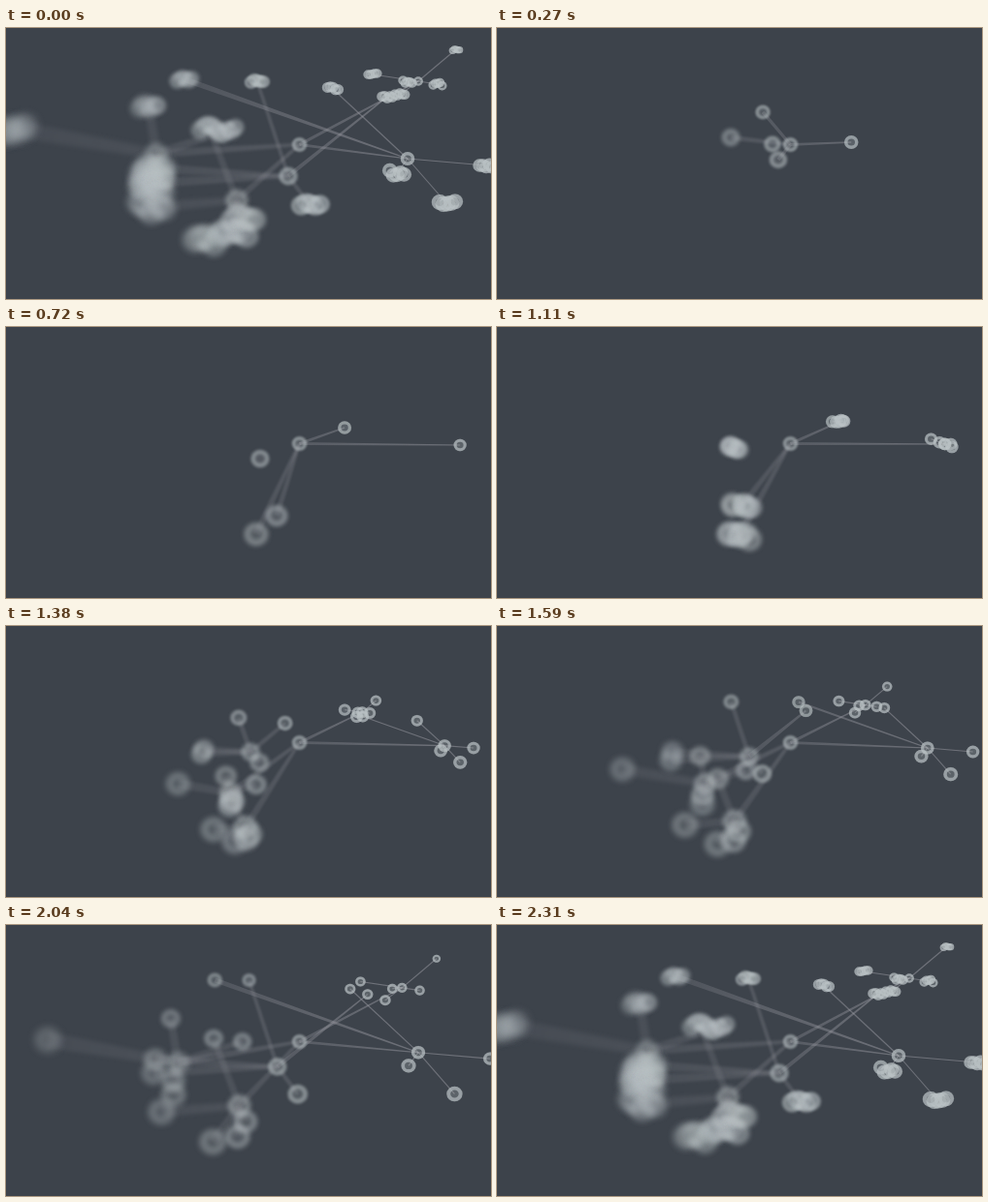
Recreate the animation shown at these times as an HTML page with a canvas. Size 500 by 280 pixels, loop 2.34 s.

```html
<!DOCTYPE html>
<html lang="en">
<head>
<meta charset="utf-8">
<title>Growing network</title>
<style>
  html, body { margin: 0; width: 100%; height: 100%; overflow: hidden; background: #3d434b; }
  canvas { display: block; }
</style>
</head>
<body>
<canvas id="stage" width="500" height="280"></canvas>
<script>
const ctx = document.getElementById('stage').getContext('2d');
const LOOP = 2340, START = 30, SPLIT = 1080, BURST = 2190, END = 2310;
const ROOT = [302.5, 120.5];
const HUB_TIMES = [START, 270, 720, 1110, END];

// Each branch: the hub's key points, then where its leaves end up.
const branches = [
  branch([[274, 87], [349, 104], [353, 98], [425, 55]],
    [[378, 48], [414, 56], [464, 22], [445, 58], [406, 69]]),
  branch([[365, 118], [468, 122], [462, 121], [414, 135]],
    [[184, 53], [337, 63], [403, 150], [495, 142], [455, 182]]),
  branch([[241, 113], [279, 195], [253, 184], [155, 130]],
    [[147, 80], [8, 104], [228, 106], [150, 166], [150, 150]]),
  branch([[290, 136], [258, 214], [250, 215], [238, 178]],
    [[209, 102], [150, 185], [208, 219], [236, 213], [245, 196]]),
  branch([[284, 120], [262, 136], [245, 126], [291, 153]],
    [[393, 71], [259, 55], [151, 160], [314, 184], [153, 145]], true)
];

function branch(path, tips, detached = false) {
  const [endX, endY] = path[path.length - 1];
  const offsets = tips.map(([x, y]) => [x - endX, y - endY]);
  return { path: [ROOT, ...path], offsets, detached };
}

// Smooth cubic path through the hub's key points.
function follow(points, t) {
  const times = HUB_TIMES, last = times.length - 1;
  let i = 0;
  while (i < last - 1 && t > times[i + 1]) i++;
  const span = times[i + 1] - times[i], u = (t - times[i]) / span;
  return [0, 1].map(axis => {
    const slope = k => {
      const a = Math.max(0, k - 1), b = Math.min(last, k + 1);
      return (points[b][axis] - points[a][axis]) / (times[b] - times[a]) * span;
    };
    const p = points[i][axis], q = points[i + 1][axis], m = slope(i), n = slope(i + 1);
    return p + u * (m + u * (3 * (q - p) - 2 * m - n + u * (2 * (p - q) + m + n)));
  });
}

function random(seed) {
  const s = Math.sin(seed * 127.1) * 43758.5453;
  return s - Math.floor(s);
}

// Newborn siblings fan out mostly sideways.
function scatter([x, y], k, seed, amount) {
  const r = radius([x, y]) * amount;
  return [x + (k - 2) * 0.42 * r, y + (random(seed * 5 + k) - 0.5) * 0.7 * r];
}

// The graph lies on a tilted plane: size and focus depend on position.
const defocus = ([x, y]) => Math.max(0, (385 - x + 0.6 * (y - 120)) * 0.014);
const radius = p => 8.3 - 0.006 * (p[0] - 302) + 0.032 * (p[1] - 120) + 0.8 * defocus(p);
const soften = b => ctx.filter = b > 0.15 ? `blur(${b.toFixed(2)}px)` : 'none';

function node(p, scale = 1) {
  const r = radius(p) * scale, b = defocus(p);
  const tint = alpha => `rgba(186,194,197,${alpha / (1 + 0.2 * b)})`;
  const ring = size => {
    ctx.beginPath();
    ctx.ellipse(...p, r * size, r * size * 0.95, 0, 0, 7);
  };
  soften(b);
  ctx.fillStyle = tint(0.25);
  ring(0.92);
  ctx.fill();
  ctx.strokeStyle = tint(0.64);
  ctx.lineWidth = r * 0.42;
  ring(0.68);
  ctx.stroke();
}

// A tapered line, wider and fainter where it is out of focus.
function link(p, q) {
  const dx = q[0] - p[0], dy = q[1] - p[1], length = Math.hypot(dx, dy);
  if (length < 1) return;
  const ends = [p, q].map(defocus);
  const shade = ctx.createLinearGradient(...p, ...q);
  ends.forEach((b, i) => shade.addColorStop(i, `rgba(160,160,168,${0.5 / (1 + 0.8 * b)})`));
  const [w, v] = ends.map(b => (1.1 + 1.3 * b + 0.4 * b * b) / 2 / length);
  soften((ends[0] + ends[1]) * 0.3);
  ctx.fillStyle = shade;
  ctx.beginPath();
  ctx.moveTo(p[0] - dy * w, p[1] + dx * w);
  ctx.lineTo(q[0] - dy * v, q[1] + dx * v);
  ctx.lineTo(q[0] + dy * v, q[1] - dx * v);
  ctx.lineTo(p[0] + dy * w, p[1] - dx * w);
  ctx.fill();
}

function grow(hub, offsets, t, seed) {
  if (t <= SPLIT) return [];
  const rest = 1 - (t - SPLIT) / (END - SPLIT), reach = 1 - rest ** 1.6;
  return offsets.map(([x, y], k) =>
    scatter([hub[0] + x * reach, hub[1] + y * reach], k, seed, rest ** 6));
}

function draw(now) {
  let t = now % LOOP;
  if (t < START || t > END) t = END;
  ctx.filter = 'none';
  ctx.fillStyle = '#3d434b';
  ctx.fillRect(0, 0, 500, 280);

  const pose = branches.map(({ path, offsets, detached }, i) => {
    const hub = follow(path, t);
    return { hub, detached, leaves: grow(hub, offsets, t, i + 1) };
  });
  for (const { hub, leaves, detached } of pose) {
    if (!detached) link(ROOT, hub);
    leaves.forEach(leaf => link(hub, leaf));
  }
  node(ROOT, 0.92);
  const spread = (t - BURST) / (END - BURST);
  pose.forEach(({ hub, leaves }, i) => {
    node(hub);
    leaves.forEach((leaf, j) => {
      if (spread <= 0) return node(leaf);
      for (let k = 0; k < 5; k++) node(scatter(leaf, k, i * 5 + j + 1, spread));
    });
  });
}

const begin = performance.now();
function tick() {
  draw(performance.now() - begin);
  requestAnimationFrame(tick);
}
tick();
</script>
</body>
</html>
```
